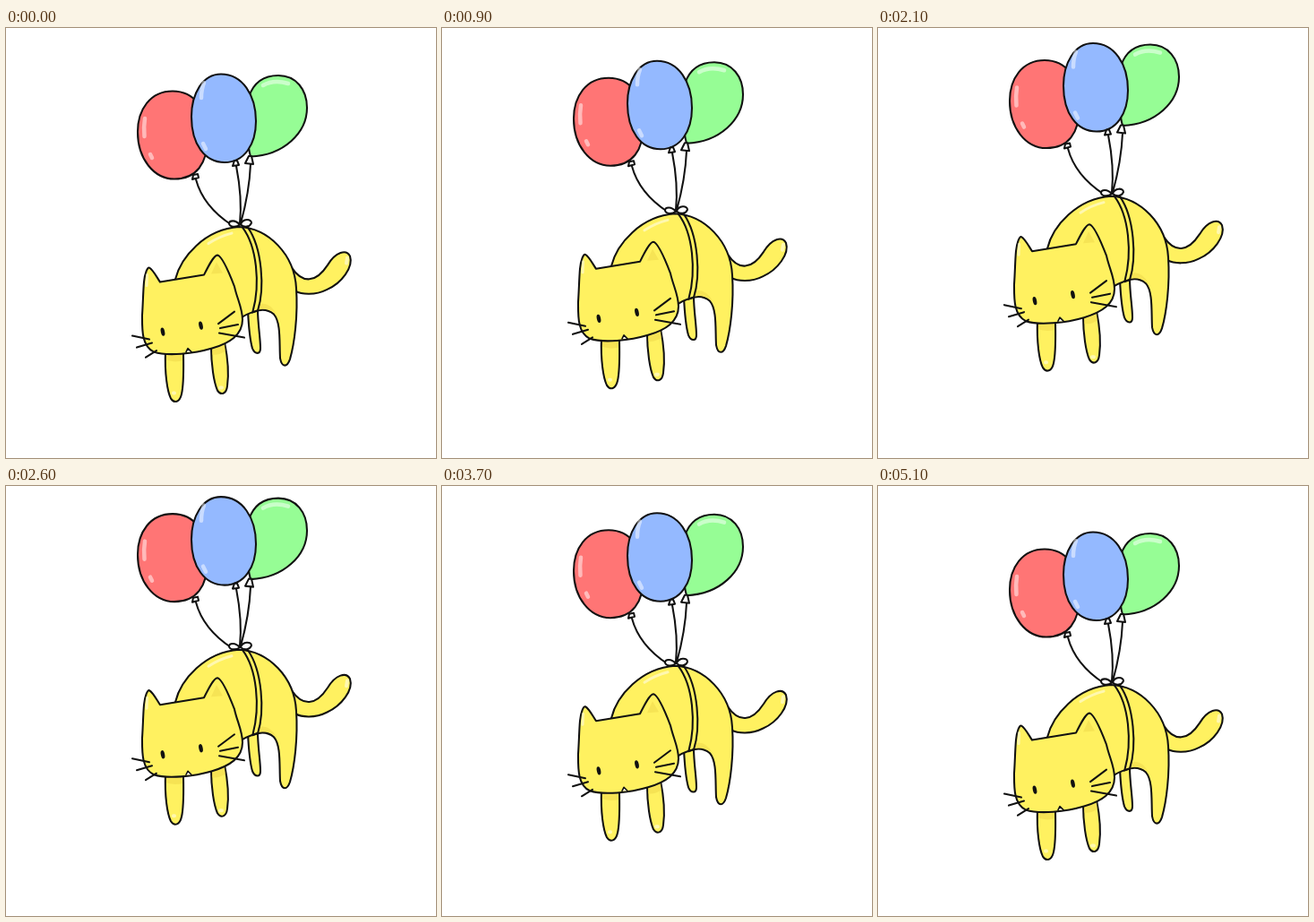
Animation, 480 px wide and 480 px high, one loop 5.2 s. Source, as an HTML page:

```html
<!DOCTYPE html>
<html lang="en">
<head>
<meta charset="utf-8">
<title>Floating cat</title>
<style>
html, body { margin: 0; width: 100%; height: 100%; overflow: hidden; background: #fff; }
svg { display: block; width: 100vw; height: 100vh; }
.ink { stroke: #111; stroke-width: 2.050; stroke-linecap: round; stroke-linejoin: round; fill: none; }
.ink .fur { fill: #fff160; }
.ink .white { fill: #fff; }
.shine { stroke: #fff; stroke-opacity: .5; stroke-width: 4.5; stroke-linecap: round; fill: none; }
.shade { fill: #eed94c; fill-opacity: .55; stroke: none; }
</style>
</head>
<body>
<svg viewBox="0 0 480 480">
  <g id="flyer">
    <g class="ink">
      <path fill="#ff7575" d="M186 70.500C161 70.500 147 91 147 116C147 146 165 168.500 188 168.500C212 168.500 225 152 225 122C225 90 210 70.500 186 70.500Z"/>
      <path fill="#96fd95" d="M304 53C324 53 336 69 336 89C336 117 310 142 273 143.500C269 130 268 100 271 77C276 62 286 53 304 53Z"/>
      <path fill="#94b9ff" d="M240 51.500C219 51.500 207 74 207 99C207 130 222 150 244 150C266 150 279 130 279 104C279 75 264 51.500 240 51.500Z"/>
      <path d="M212 169Q220 199 252 220M257 154Q264 190 261 218M273 152C272 175 267 200 262 218"/>
      <path class="white" d="M209 164L214 163L215 167L208 169Z"/>
      <path class="white" d="M255 148L253 154L260 153L258 148Z"/>
      <path class="white" d="M271 143L267 151L276 152L274 143Z"/>
    </g>
    <g class="shine">
      <path d="M155 101Q153.500 110 154.500 121M161 141L163 145"/>
      <path d="M221 61Q218 68 218 78M220 129L223 135"/>
      <path d="M287 64Q299 57 315 62"/>
    </g>

    <g transform="translate(0 .6)">
      <g class="ink">
        <path class="fur" d="M319 267C331 285 346 284 359 264C368 249 380 246 384 254C388 266 375 284 358 291.500C345 298 330 297 323 293"/>
        <path class="fur" d="M270 315C271 335 273 350 275 357C278 364 284 364 284 357C284 345 281 330 281 313"/>
        <path class="fur" d="M189 280C195 255 222 224 260 221.500C293 223 322 252 324 290C326 320 322 352 317 369C314 378 308 379 306 368C305 350 307 328 299 319C291 312 281 314 274 317Q268 319 262 323L220 340Z"/>
      </g>
      <path class="shade" d="M281 308Q294 304 302 319Q295 311 281 314Z"/>
      <g class="ink">
        <path d="M264 222C280 243 284 285 275.500 316M270 222C286 245 289 290 281 315M275 317L281 315"/>
        <path class="white" d="M261 219C256 213 249 214 249 218C250 222 257 222 261 219Z"/>
        <path class="white" d="M262 219C264 212 274 212 274 217C272 222 266 222 262 219Z"/>
        <path class="fur" d="M178 360C177 385 180 405 184 413C188 419 194 417 196 408C199 395 198 375 198 360"/>
        <path class="fur" d="M229 355C229 375 232 395 236 404C240 410 246 408 247 399C249 385 247 365 244 350"/>
      </g>
      <path class="shade" d="M179 362H197V371Q187 373 179 370ZM230 356L244 351L245 360Q238 365 230 364Z"/>
      <g class="ink">
        <path class="fur" d="M154 283C155 273 158 266 160 267C164 269 168 277 172 283L221 275C226 265 232 253 236 253C241 254 250 275 255 288C258 302 264 312 264 325C264 342 250 351 230 357C210 363 180 366 165 361C151 354 152 335 152 320C153 305 153 295 154 283Z"/>
      </g>
      <path class="shade" d="M235 261L242 273L229 274Z"/>
      <g class="shine">
        <path d="M226 240Q238 232 252 228.500M157.500 275L157 287" stroke-width="3"/>
        <path d="M381 256L380 262M187 407H188M239 401H241" stroke-width="4"/>
      </g>
      <g class="ink">
        <path d="M237 329.500L255 316M239 334.500L259 330.500M238 340L266 345M141 343L160 347M146 356L163 351M156 367L168 359.500"/>
        <path class="white" d="M201 361L203 357L207 361" stroke-width="1.600"/>
      </g>
      <g fill="#111">
        <ellipse cx="175" cy="338.500" rx="2.200" ry="4.700" transform="rotate(-12 175 338.500)"/>
        <ellipse cx="217.500" cy="331.500" rx="2.200" ry="4.700" transform="rotate(-12 217.500 331.500)"/>
      </g>
    </g>
  </g>
</svg>
<script>
const LOOP = 5200, STEP = 100, HALF = 2500, RISE = 41;
const flyer = document.getElementById('flyer');
const start = performance.now();

// Steady climb, then steady descent, with a short rest at the bottom.
function lift(t) {
  return RISE * Math.max(0, 1 - Math.abs(t - HALF) / HALF);
}

function draw(now) {
  const t = Math.floor(Math.max(0, now - start) % LOOP / STEP) * STEP;
  flyer.setAttribute('transform', `translate(0 ${-lift(t).toFixed(2)})`);
  requestAnimationFrame(draw);
}
draw(start);
</script>
</body>
</html>
```
